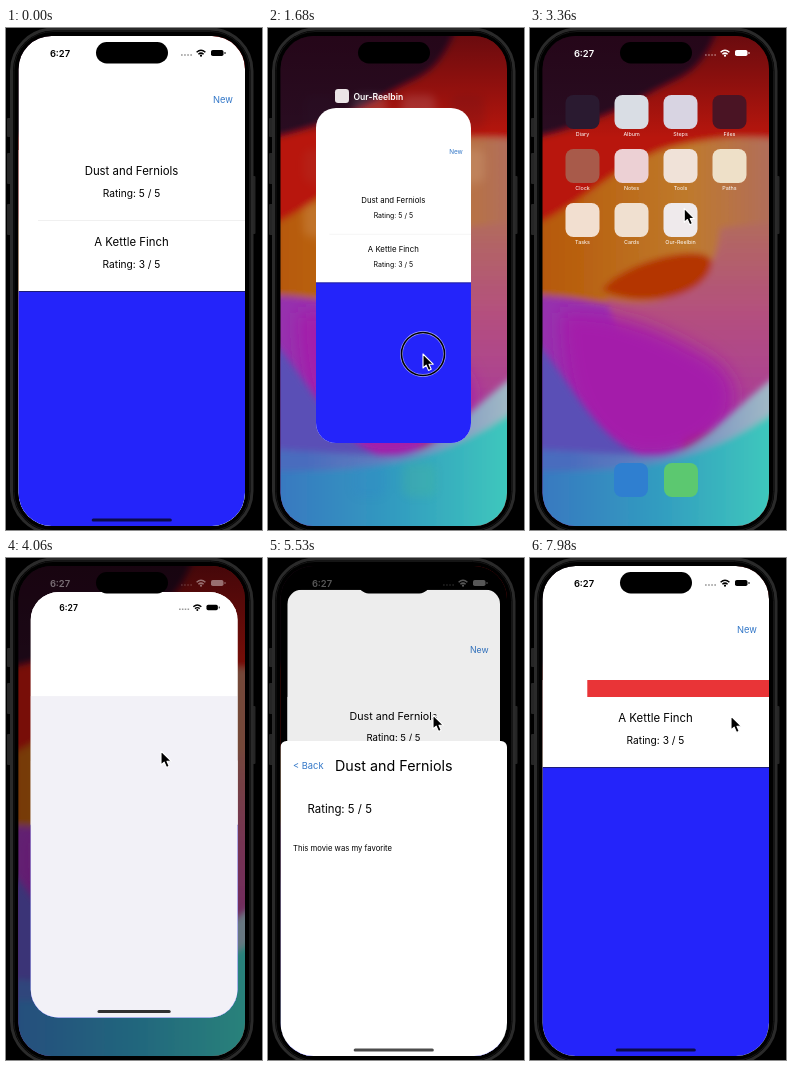
Write an HTML page that moves like this. It is 256 px wide and 502 px high and loops after 8000 ms.

```html
<!DOCTYPE html>
<html lang="en">
<head>
<meta charset="utf-8">
<title>Film list</title>
<style>
  html, body { margin: 0; width: 100%; height: 100%; overflow: hidden; background: #000; }
  svg { display: block; width: 256px; height: 502px; font-family: Inter, "Liberation Sans", sans-serif; }
  .mid { text-anchor: middle; }
  .title { font-size: 11.4px; }
  .rate { font-size: 10.2px; }
  .link { font-size: 9.3px; fill: #3478c8; }
  .time { font-size: 9.4px; font-weight: 600; }
  .label { font-size: 5.4px; fill: #fff; text-anchor: middle; }
</style>
</head>
<body>
<svg viewBox="0 0 256 502">
  <defs>
    <clipPath id="screen"><rect x="12.5" y="8" width="226.5" height="490" rx="33"/></clipPath>
    <clipPath id="cardClip"><rect id="cardShape"/></clipPath>
    <clipPath id="rowClip"><rect id="rowShape" x="12" y="122" width="227" height="71"/></clipPath>
    <filter id="soft" x="-10%" y="-10%" width="120%" height="120%"><feGaussianBlur stdDeviation="3"/></filter>
    <filter id="haze" x="-40%" y="-40%" width="180%" height="180%"><feGaussianBlur stdDeviation="9"/></filter>
    <linearGradient id="sand"><stop offset=".1" stop-color="#b65806"/><stop offset=".6" stop-color="#bf7a2c"/><stop offset=".9" stop-color="#b06c5e"/></linearGradient>
    <linearGradient id="rose" x2="0" y2="1"><stop stop-color="#b26c5c"/><stop offset=".45" stop-color="#b4507e"/><stop offset="1" stop-color="#a83a9c"/></linearGradient>
    <linearGradient id="shore"><stop offset=".2" stop-color="#4a6cbe"/><stop offset=".55" stop-color="#6c86c0"/><stop offset=".9" stop-color="#a4bcc6"/></linearGradient>
    <linearGradient id="sea"><stop offset=".1" stop-color="#3878c0"/><stop offset=".5" stop-color="#329cc0"/><stop offset=".9" stop-color="#3fcabc"/></linearGradient>
    <linearGradient id="shade" x2="0" y2="1"><stop stop-color="#200010" stop-opacity=".55"/><stop offset="1" stop-color="#200010" stop-opacity="0"/></linearGradient>
    <g id="status">
      <text class="time mid" x="54" y="28.5">6:27</text>
      <path d="M175 27h11" stroke="currentColor" stroke-width="1.6" stroke-dasharray="1.7 1.4" opacity=".4"/>
      <g fill="none" stroke="currentColor" stroke-width="1.5">
        <path d="M190.6 24.2Q195 20.2 199.4 24.2M192.4 26.2Q195 24 197.6 26.2"/>
      </g>
      <circle cx="195" cy="27.7" r="1.1"/>
      <rect x="205" y="22" width="12.5" height="6" rx="1.8"/>
      <path d="M219 24v2" stroke="currentColor"/>
    </g>
  </defs>

  <!-- device -->
  <rect width="256" height="502"/>
  <g fill="#252525">
    <rect x="1" y="90" width="4" height="19" rx="1"/>
    <rect x="1" y="125" width="4" height="31" rx="1"/>
    <rect x="1" y="176" width="4" height="31" rx="1"/>
    <rect x="246" y="148" width="3.5" height="58" rx="1"/>
  </g>
  <rect x="5.5" y="1" width="240.5" height="504" rx="42" stroke="#2a2a2a" stroke-width="3"/>
  <rect x="8" y="3.5" width="235.5" height="499" rx="39" fill="none" stroke="#151515"/>

  <g clip-path="url(#screen)">
    <g id="home">
      <g filter="url(#soft)">
        <rect x="-20" y="-20" width="296" height="542" fill="#b81608"/>
        <path d="M-20 -20H196C184 20 172 40 148 52C112 68 80 96 -20 116Z" fill="#2c0820"/>
        <path d="M-20 206C50 186 84 130 150 117S230 112 276 112V340H-20Z" fill="url(#sand)"/>
        <path d="M-20 269C50 262 90 288 150 280V522H-20Z" fill="#9632ae"/>
        <path d="M76 271C130 284 188 264 190 200L276 190V400H120Z" fill="url(#rose)"/>
        <path d="M72 262C92 234 176 212 182 234C180 266 118 284 72 262" fill="#b43406"/>
      </g>
      <path d="M30 285C80 280 130 300 180 330S200 430 120 430S30 340 30 285" fill="#a41eaa" filter="url(#haze)"/>
      <g filter="url(#soft)">
        <path d="M-20 290C34 330 54 405 112 428L-20 522Z" fill="#5a50b6"/>
        <path d="M-20 420C60 424 90 428 128 427C180 422 205 370 276 328V522H-20Z" fill="url(#shore)"/>
        <path d="M-20 442C110 446 184 436 276 360V522H-20Z" fill="url(#sea)"/>
      </g>
      <rect width="256" height="110" fill="url(#shade)"/>
      <g id="icons"></g>
      <g id="dock">
        <rect x="84" y="435" width="34" height="34" rx="8" fill="#2f7fd0"/>
        <rect x="134" y="435" width="34" height="34" rx="8" fill="#5cc870"/>
      </g>
      <rect id="dim" width="256" height="502"/>
    </g>
    <rect id="black" width="256" height="502"/>
    <use id="outerStatus" href="#status" fill="#fff" color="#fff"/>

    <g id="tag">
      <rect x="67" y="61" width="14" height="14" rx="3.2" fill="#ebe4e6"/>
      <text x="85.5" y="71.5" font-size="8.6" font-weight="600" fill="#fff">Our-Reelbin</text>
    </g>

    <g id="card" clip-path="url(#cardClip)">
      <g id="page">
        <rect x="12" y="8" width="228" height="560" fill="#fff"/>
        <text class="link mid" x="217" y="75.3">New</text>
        <g clip-path="url(#rowClip)">
          <rect id="red" y="122" width="227" height="71" fill="#e93437"/>
          <text x="217.5" y="161" font-size="9" fill="#fff" class="mid">Delete</text>
          <g id="row">
            <rect x="12" y="122" width="227" height="71" fill="#fff"/>
            <text class="title mid" x="125.5" y="147.2">Dust and Ferniols</text>
            <text class="rate mid" x="125.5" y="168.7">Rating: 5 / 5</text>
          </g>
        </g>
        <g id="rest">
          <rect x="12" y="193" width="228" height="71" fill="#fff"/>
          <path id="rule" d="M32 192.5H239" stroke="#f0f0f0"/>
          <text class="title mid" x="125.5" y="218.2">A Kettle Finch</text>
          <text class="rate mid" x="125.5" y="239.7">Rating: 3 / 5</text>
          <rect x="12" y="263" width="228" height="380" fill="#2424fa"/>
          <path d="M12 263.5H240" stroke="#1c1c78"/>
        </g>
        <g id="splash">
          <rect x="12" y="8" width="228" height="114" fill="#fff"/>
          <rect x="12" y="122" width="228" height="446" fill="#f2f1f7"/>
        </g>
        <use id="innerStatus" href="#status" color="#000"/>
        <rect id="pageDim" width="256" height="568"/>
      </g>
    </g>

    <g id="sheet">
      <rect x="12.5" width="226.5" height="520" rx="6" fill="#fff"/>
      <text class="link" x="25" y="28.3">&lt; Back</text>
      <text x="67" y="29.6" font-size="14.3">Dust and Ferniols</text>
      <text x="39.5" y="71.5" font-size="11.4">Rating: 5 / 5</text>
      <text x="25" y="110" font-size="7.7">This movie was my favorite</text>
    </g>
    <rect id="bar" height="3" rx="1.5"/>
    <rect x="90" y="14" width="72" height="21.5" rx="10.7"/>
  </g>

  <g id="pointer">
    <g id="ring" fill="none">
      <circle r="21.5" stroke="#fff" stroke-width="2.8" opacity=".6"/>
      <circle r="21.5" stroke="#000" stroke-width="1.6"/>
    </g>
    <path d="M0 0V14L3.2 11.2L5.5 16.4L8.2 15.2L6 10.2H10.2Z" stroke="#fff" stroke-width="1.1" stroke-linejoin="round"/>
  </g>
</svg>

<script>
const LOOP = 8000, STEP = 70;
const el = {};
document.querySelectorAll('[id]').forEach(n => el[n.id] = n);

const set = (n, attrs) => { for (const k in attrs) n.setAttribute(k, attrs[k]); };
const mix = (a, b, p) => a + (b - a) * p;
const linear = p => p;
const out = p => 1 - (1 - p) ** 3;
const smooth = p => p * p * (3 - 2 * p);

// Keys are [time, value or list, easing towards this key].
function track(keys, t) {
  const i = keys.findIndex(k => k[0] > t);
  if (i < 0) return keys[keys.length - 1][1];
  if (i === 0) return keys[0][1];
  const [t0, a] = keys[i - 1], [t1, b, ease = smooth] = keys[i];
  const p = ease((t - t0) / (t1 - t0));
  return Array.isArray(a) ? a.map((v, j) => mix(v, b[j], p)) : mix(a, b, p);
}

const FULL = [12.5, 8, 226.5, 490, 33];
const SMALL = [48, 80, 155, 335, 20];
const ICON = [134, 175, 34, 34, 8];
const lifted = dy => SMALL.map((v, i) => i === 1 ? v - dy : v);

const cardKeys = [
  [0, FULL], [500, FULL], [1050, [44, 70, 164, 356, 24]], [1540, SMALL], [2170, SMALL],
  [2450, lifted(90), linear], [2660, lifted(230), linear], [2800, lifted(389), linear],
  [2940, lifted(470), linear], [3000, ICON], [3700, ICON],
  [4060, [24.7, 34, 206.8, 425.6, 28], linear], [4400, FULL, out]
];
const pointerKeys = [
  [0, [204, 510]], [140, [204, 506]], [210, [203, 500]], [420, [136, 491]], [560, [136, 491]],
  [1050, [150, 335]], [1540, [155, 326]], [2170, [155, 326]], [2450, [153, 235], linear],
  [2660, [148, 95], linear], [2800, [144.5, 22], out], [3010, [144.5, 22]], [3430, [155, 193]],
  [4620, [155, 193]], [5040, [165, 157]], [5600, [165, 157]], [5950, [40, 72]],
  [6230, [40, 72]], [6720, [184, 155]], [6930, [184, 155]], [7280, [112, 155]],
  [7400, [112, 155]], [7700, [201, 158]]
];
const presses = [[560, 1400], [1650, 2700], [3570, 3700], [5180, 5320], [6100, 6230], [6800, 7330], [7740, 7860]];
const sheetKeys = [[5320, 0], [5530, .7, linear], [5880, 1, out], [6230, 1], [6580, 0, out]];
const iconKeys = [[2170, .15], [2800, .32], [3010, 1], [3700, 1], [3980, 0]];
const statusKeys = [[2800, 0], [3010, 1], [3700, 1], [4060, .42]];
const tagKeys = [[1050, 0], [1400, 1], [2600, 1], [2800, 0]];
const dimKeys = [[3700, 0], [4060, .35]];
const splashKeys = [[4270, 1], [4410, 0]];
const barKeys = [[560, .7], [900, 0], [3700, 0], [3900, .85], [4300, .7]];
const swipeKeys = [[6930, 0], [7280, 42]];
const removeKeys = [[7840, 0], [7980, .76, linear]];

const words = 'Diary Album Steps Files Clock Notes Tools Paths Tasks Cards Our-Reelbin'.split(' ');
const tints = ['#2a1a30', '#d9dde4', '#d8d4e2', '#4a1424', '#a85a4a', '#ecd0d4', '#f0e2d8', '#eee0c8', '#f2dfd0', '#f0e0d0', '#efeaec'];
el.icons.innerHTML = words.map((w, i) => {
  const x = 52.5 + i % 4 * 49, y = 84 + Math.floor(i / 4) * 54;
  return `<rect x="${x - 17}" y="${y - 17}" width="34" height="34" rx="8" fill="${tints[i]}"/>
    <text class="label" x="${x}" y="${y + 24}">${w}</text>`;
}).join('');

function drawList(t) {
  const gone = track(removeKeys, t);
  const shift = track(swipeKeys, t) + 184 * gone;
  set(el.red, { x: 239 - shift });
  set(el.row, { transform: `translate(${-shift} 0)` });
  set(el.rowShape, { height: 71 * (1 - gone) });
  set(el.rest, { transform: `translate(0 ${-71 * gone})` });
  set(el.rule, { opacity: gone ? 0 : 1 });
}

function drawHome(t) {
  const shown = track(iconKeys, t);
  el.icons.style.filter = el.dock.style.filter = shown < 1 ? `blur(${(1 - shown) * 5}px)` : 'none';
  set(el.icons, { opacity: shown });
  set(el.dock, { opacity: shown });
  set(el.dim, { opacity: track(dimKeys, t) });
  set(el.black, { opacity: t >= 4400 ? 1 : 0 });
}

function drawCard(t, up) {
  let [x, y, w, h, r] = track(cardKeys, t);
  const size = 80 * w / 226, visible = track(barKeys, t);
  set(el.bar, { x: x + w / 2 - size / 2, y: y + h - 7.6, width: size, opacity: visible });

  x += 10 * up; y += 34 * up; w -= 20 * up; r -= 27 * up;
  set(el.cardShape, { x, y, width: w, height: h, rx: r });
  set(el.page, { transform: `translate(${x} ${y}) scale(${w / 226.5}) translate(-12.5 -8)` });
  set(el.card, { opacity: t < 2960 ? 1 : track([[3690, 0], [3770, 1]], t) });
  set(el.splash, { opacity: t > 2960 ? track(splashKeys, t) : 0 });
  set(el.pageDim, { opacity: .1 * up });
  set(el.tag, { opacity: track(tagKeys, t), transform: `translate(0 ${y - 80})` });
  set(el.innerStatus, { opacity: Math.max(0, Math.min(1, visible / .7) - 2 * up) });
  set(el.outerStatus, { opacity: t < 4400 ? track(statusKeys, t) : up ** 3 });
}

function drawPointer(t) {
  const [x, y] = track(pointerKeys, t);
  set(el.pointer, { transform: `translate(${x} ${y})` });
  set(el.ring, { opacity: presses.some(([a, b]) => t >= a && t < b) ? 1 : 0 });
}

function draw(t) {
  const up = track(sheetKeys, t);
  drawHome(t);
  drawList(t);
  drawCard(t, up);
  set(el.sheet, { transform: `translate(0 ${498 - 450 * up})`, opacity: up ? 1 : 0 });
  drawPointer(t);
}

const start = performance.now();
function tick() {
  const t = (performance.now() - start) % LOOP;
  draw(Math.floor(t / STEP) * STEP);
  requestAnimationFrame(tick);
}
tick();
</script>
</body>
</html>
```
